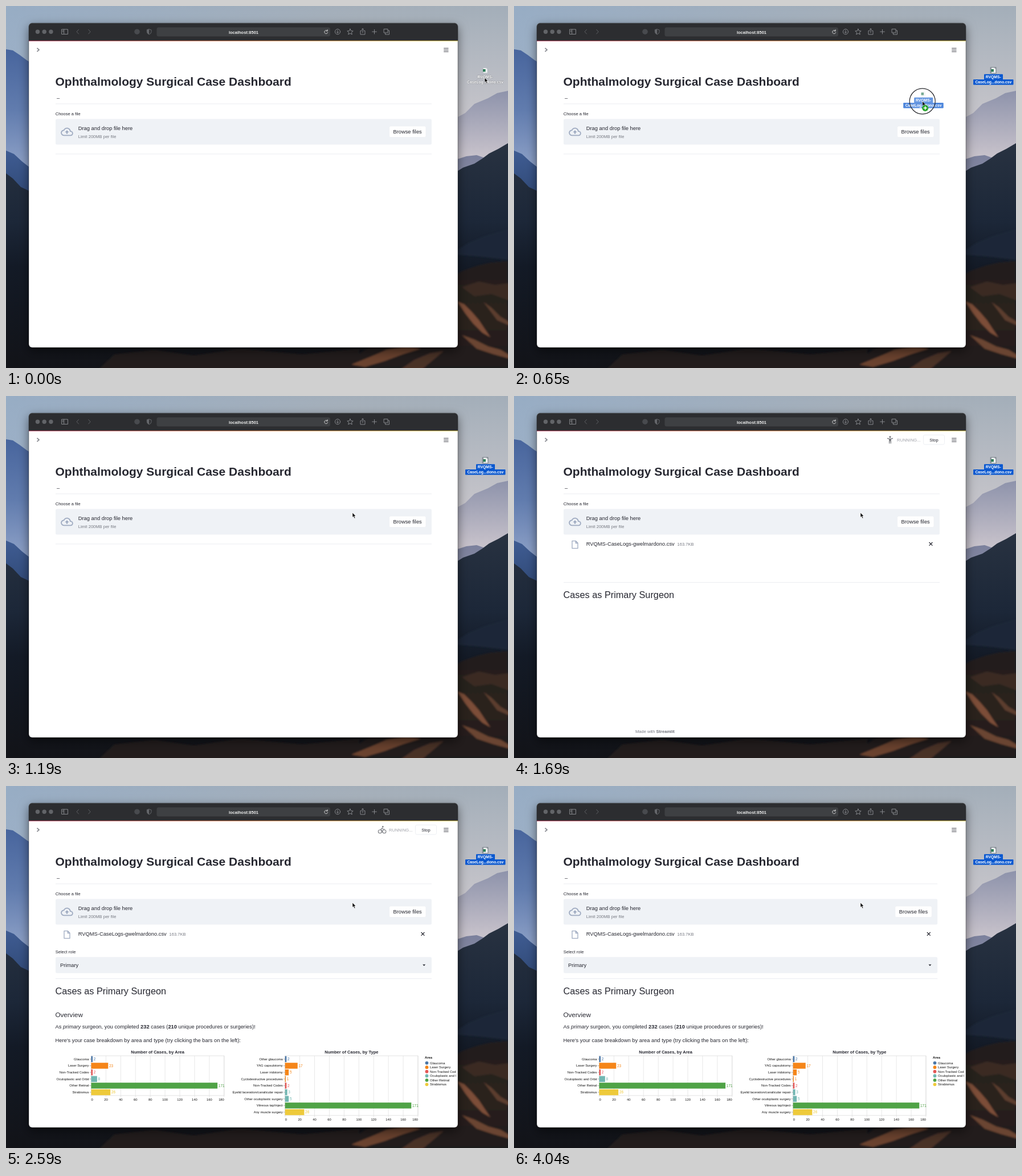
Write an HTML page that moves like this. It is 881 px wide and 636 px high and loops after 4.14 s.

```html
<!DOCTYPE html>
<html lang="en">
<head>
<meta charset="utf-8">
<title>Case dashboard upload</title>
<style>
  html, body { margin: 0; width: 100%; height: 100%; overflow: hidden; }
  svg { display: block; }
  text { font-family: "Liberation Sans", Arial, sans-serif; font-size: 9.35px; fill: #262730; }
  .title { font-size: 21px; font-weight: bold; }
  .head { font-size: 16.3px; }
  .sub { font-size: 11.6px; }
  .small { font-size: 7.55px; }
  .dim { fill: #777a83; }
  .bold { font-weight: bold; }
  .tick { font-size: 5.8px; fill: #111; }
  .value { font-size: 6.4px; }
  .end { text-anchor: end; }
  .mid { text-anchor: middle; }
  .file text { font-size: 6.75px; font-weight: bold; fill: #fff; text-anchor: middle; }
  .plain text { paint-order: stroke; stroke: #0004; stroke-width: .8px; }
  .wide { x: 87px; width: 660px; }
  .narrow .wide { width: 656.2px; }
  .narrow .edge { transform: translateX(-3.7px); }
  .rule { height: 1px; fill: #ebedf1; }
  .field { fill: #eff2f6; }
  .line { fill: none; stroke: #85878b; stroke-width: 1; stroke-linecap: round; stroke-linejoin: round; }
  .run { fill: none; stroke: #7b7d82; stroke-width: 1.1; stroke-linecap: round; stroke-linejoin: round; }
</style>
</head>
<body>
<svg id="stage" width="881" height="636" viewBox="0 0 881 636">
  <defs>
    <linearGradient id="sky" x2="0" y2=".32">
      <stop stop-color="#a3aeb9"/><stop offset="1" stop-color="#c8c6cb"/>
    </linearGradient>
    <linearGradient id="cool">
      <stop stop-color="#93acc8" stop-opacity=".75"/><stop offset=".7" stop-color="#93acc8" stop-opacity="0"/>
    </linearGradient>
    <linearGradient id="blue" x2="0" y2="1">
      <stop stop-color="#48659d"/><stop offset=".5" stop-color="#617cae"/><stop offset="1" stop-color="#91a4c9"/>
    </linearGradient>
    <linearGradient id="deep" x2="0" y2="1">
      <stop stop-color="#3f5c92"/><stop offset="1" stop-color="#2c4470"/>
    </linearGradient>
    <linearGradient id="haze" x2="0" y2="1">
      <stop stop-color="#8e93ab"/><stop offset=".8" stop-color="#c6c1ca"/>
    </linearGradient>
    <linearGradient id="far" x2="0" y2="1">
      <stop stop-color="#7b809c"/><stop offset="1" stop-color="#9295ab"/>
    </linearGradient>
    <linearGradient id="night" x2="0" y2="1">
      <stop stop-color="#283241"/><stop offset=".35" stop-color="#1c2738"/><stop offset=".55" stop-color="#131a26"/><stop offset="1" stop-color="#121318"/>
    </linearGradient>
    <linearGradient id="slope" x2="0" y2="1">
      <stop stop-color="#211e1f"/><stop offset=".5" stop-color="#2b211e"/><stop offset="1" stop-color="#1d1919"/>
    </linearGradient>
    <linearGradient id="strip">
      <stop stop-color="#a02a4a"/><stop offset=".5" stop-color="#c8713e"/><stop offset="1" stop-color="#d8c34a"/>
    </linearGradient>
    <filter id="shadow" x="-10%" y="-10%" width="120%" height="125%">
      <feDropShadow dx="0" dy="6" stdDeviation="9" flood-opacity=".5"/>
    </filter>
    <filter id="soft"><feGaussianBlur stdDeviation="1.5"/></filter>
    <clipPath id="legendClip"><rect x="730" y="465" width="60" height="70"/></clipPath>
  </defs>

  <!-- wallpaper -->
  <rect width="881" height="636" fill="url(#sky)"/>
  <rect width="881" height="636" fill="url(#cool)"/>
  <path fill="url(#blue)" d="M0 76 12 78 24 86 36 95 60 110V290H0z"/>
  <path fill="url(#deep)" d="M0 254 14 260 28 273 42 284 60 290V360H0z"/>
  <path fill="url(#haze)" d="M780 202 806 188 822 172 846 162 862 153 881 149V290H780z"/>
  <path fill="url(#far)" d="M780 273 808 264 826 262 846 269 881 266V330H780z"/>
  <path fill="url(#night)" d="M0 294 12 303 26 318 60 334 780 298 802 284 822 277 836 268 848 259 864 251 881 241V636H0z"/>
  <g filter="url(#soft)">
    <path fill="#1d2838" d="M780 436 812 416 840 404 881 392V446L830 440z"/>
    <path fill="url(#slope)" d="M780 480 800 466 828 456 850 451 881 448V650H560L640 598H780z"/>
    <path fill="#3a2a23" d="M800 494 830 484 858 490 890 486V520L852 506 822 510z"/>
    <path fill="#7c4e37" d="M792 519 804 524 818 538 830 552 842 570 850 582 836 574 820 558 806 540z"/>
    <path fill="#5c3c2d" d="M838 520 852 530 868 546 885 556V562L862 552z"/>
    <path fill="#6a4431" d="M800 578 822 586 846 598 868 604 885 614V620L856 612 826 602z"/>
    <path fill="#211b1a" d="M150 650 190 612 260 604 330 614 410 602 520 612 620 602V650z"/>
    <path fill="#6a432f" d="M606 630 640 616 668 604 704 598 728 602 696 612 664 624 630 634z"/>
    <path fill="#4a3026" d="M690 640 716 622 744 610 768 606 752 620 728 640z"/>
  </g>

  <!-- browser window -->
  <rect x="40" y="30" width="753" height="570" rx="6" fill="#fff" stroke="#0006" stroke-width=".8" filter="url(#shadow)"/>
  <path fill="#2c2d30" d="M40 61V36a6 6 0 0 1 6-6H787a6 6 0 0 1 6 6V61z"/>
  <path d="M46 30.500H787" stroke="#4a4c4f" stroke-width=".7"/>
  <rect x="40" y="60.800" width="753" height="1" fill="url(#strip)"/>
  <g fill="#626468"><circle cx="55.500" cy="45.300" r="3.700"/><circle cx="67.200" cy="45.300" r="3.700"/><circle cx="78.900" cy="45.300" r="3.700"/></g>
  <rect x="264.500" y="37.500" width="304.500" height="16" rx="3.500" fill="#3e4043"/>
  <text class="mid bold" x="417" y="48.600" style="font-size:7.5px;fill:#ececec">localhost:8501</text>
  <g class="line">
    <path d="M98 41h10.500v8.500H98zM101.700 41v8.500M99.300 43.300h1M99.300 45.200h1"/>
    <path stroke="#5d5f63" d="M127.500 41.500 124 45.200 127.500 49M144.700 41.500 148.200 45.200 144.700 49"/>
    <path d="M564 43.600A3 3 0 1 0 564.700 46.500M564.200 41.600V44H562" stroke="#d0d0d0"/>
    <circle cx="582" cy="45.200" r="4.600"/><path d="M582 42.800v4.600M580.200 45.700 582 47.500 583.800 45.700"/>
    <path d="M604 40.200 605.500 43.600 609.200 44 606.400 46.400 607.300 50 604 48.100 600.700 50 601.600 46.400 598.800 44 602.500 43.600z"/>
    <path d="M624 43.500H622V50H630V43.500H628M626 47V39.800M624.200 41.400 626 39.700 627.800 41.400"/>
    <path d="M642.700 45.200H650.300M646.500 41.400V49"/>
    <path d="M663.500 40.500h6.500v6.500h-6.500zM670.500 43h2v7h-7v-2.500"/>
    <path stroke="#65676b" d="M251.200 40.800 255 42V45.500Q254.700 48.500 251.200 50 247.700 48.500 247.400 45.500V42z"/>
  </g>
  <path fill="#65676b" d="M251.200 40.800V50Q247.700 48.500 247.400 45.500V42z"/>
  <circle cx="230" cy="45.200" r="4.800" fill="#484a4e"/>

  <!-- page -->
  <g id="page">
    <path d="M54.500 73.800 58 77 54.500 80.200" fill="none" stroke="#8b8d93" stroke-width="1.800"/>
    <path d="M768.200 74.300h8.300M768.200 77.300h8.300M768.200 80.300h8.300" stroke="#3a3b43" stroke-width="1.100"/>
    <text class="title" x="86.500" y="139.800">Ophthalmology Surgical Case Dashboard</text>
    <text x="89" y="164.500">–</text>
    <rect class="wide rule" y="171.400"/>
    <text class="small" x="86.700" y="191.600">Choose a file</text>
    <rect class="wide field" y="198.500" height="45" rx="2.500"/>
    <path transform="translate(96.200 210.200) scale(.9)" fill="#9fabc1" d="M19.350 10.040C18.670 6.590 15.640 4 12 4 9.110 4 6.600 5.640 5.350 8.040 2.340 8.360 0 10.910 0 14c0 3.310 2.690 6 6 6h13c2.760 0 5-2.240 5-5 0-2.640-2.050-4.780-4.650-4.960zM19 18H6c-2.210 0-4-1.790-4-4 0-2.050 1.530-3.760 3.560-3.970l1.070-.11.5-.95C8.080 7.140 9.940 6 12 6c2.620 0 4.880 1.860 5.390 4.430l.3 1.500 1.530.11c1.560.1 2.780 1.410 2.780 2.960 0 1.650-1.350 3-3 3zM8 13h2.550v3h2.900v-3H16l-4-4-4 4z"/>
    <text x="126.700" y="218">Drag and drop file here</text>
    <text class="small dim" x="126.700" y="232">Limit 200MB per file</text>
    <g class="edge">
      <rect x="672.500" y="211" width="64.500" height="19.700" rx="2.500" fill="#fff" stroke="#e9ebf0" stroke-width=".6"/>
      <text class="mid" x="704.600" y="223.900">Browse files</text>
    </g>

    <rect class="wide rule" y="259.500" data-on="0 1540"/>
    <g data-on="1540 4140">
      <path d="M102 254.700H108.500L112 258.300V267.700H102zM108.300 254.700V258.500H112" fill="none" stroke="#9fabc1" stroke-width="1.300" stroke-linejoin="round"/>
      <text x="126.700" y="263.200">RVQMS-CaseLogs-gwelmardono.csv</text>
      <text class="small dim" x="286.500" y="263">163.7KB</text>
      <path class="edge" d="M728.600 257 734.400 262.800M734.400 257 728.600 262.800" stroke="#262730" stroke-width="1.200"/>
    </g>
    <rect class="wide rule" y="327" data-on="1540 1740"/>
    <text class="head" x="86.500" y="355" data-on="1690 1740">Cases as Primary Surgeon</text>
    <g data-on="1740 4140">
      <text class="small" x="86.700" y="293.700">Select role</text>
      <rect class="wide field" y="300.500" height="28.300" rx="2.500"/>
      <text x="95" y="317.700">Primary</text>
      <path class="edge" d="M731.200 313.500H736.200L733.700 316.200z" fill="#262730"/>
      <rect class="wide rule" y="337.900"/>
      <text class="head" x="86.500" y="366">Cases as Primary Surgeon</text>
    </g>
    <g data-on="1790 4140">
      <text class="sub" x="86.500" y="406">Overview</text>
      <text x="86.500" y="425.800">As <tspan font-style="italic">primary</tspan> surgeon, you completed <tspan class="bold">232</tspan> cases (<tspan class="bold">210</tspan> unique procedures or surgeries)!</text>
      <text x="86.500" y="449.800">Here's your case breakdown by area and type (try clicking the bars on the left):</text>
    </g>
    <text class="small dim" x="213" y="591.800" data-on="1640 2590">Made with <tspan class="bold" style="fill:#70737b">Streamlit</tspan></text>
    <g id="charts" data-on="2590 4140"></g>

    <g id="status" data-on="1640 3540">
      <g class="run">
        <g data-on="1640 1790">
          <circle cx="660" cy="72" r="1.100" fill="#7b7d82"/>
          <path d="M655.500 74.500 658.600 75.300H661.400L664.500 74.500M658.700 75.500V83M661.300 75.500V83M660 75.500V79" stroke-width="1.300"/>
        </g>
        <g data-on="1790 2590">
          <circle cx="662.500" cy="71.800" r="1" fill="#7b7d82"/>
          <path d="M656.800 74.600 659 73.500 662 75 660.300 78.200H664L664.800 82M657.300 77.800A3.100 3.100 0 1 0 661.700 81.500"/>
        </g>
        <g data-on="2590 4140">
          <circle cx="656.300" cy="80" r="3"/><circle cx="663.900" cy="80" r="3"/><circle cx="661.300" cy="71.600" r=".9" fill="#7b7d82"/>
          <path d="M660 81.200V78.500L657.600 76.400 660 74 662 76H664.500"/>
        </g>
      </g>
      <text class="small" x="672" y="80" style="fill:#a0a2a9">RUNNING...</text>
      <rect x="718.500" y="68.500" width="37" height="16.700" rx="2.500" fill="#fff" stroke="#e9ebf0" stroke-width=".8"/>
      <text class="small mid" x="737" y="79.500">Stop</text>
    </g>
  </g>

  <!-- desktop file, drag copy and pointer -->
  <g class="file plain" data-on="0 50">
    <path d="M837.700 109H842.700L844.700 111V117.500H837.700z" fill="#eef1f1"/>
    <rect x="837" y="111" width="4.500" height="4.500" fill="#2b7b57"/>
    <text x="841" y="127.200">RVQMS-</text>
    <text x="841" y="136.200">CaseLog...dono.csv</text>
  </g>
  <g class="file" data-on="50 4140">
    <rect x="835.500" y="107" width="11.300" height="12" rx="1.500" fill="#8c929b"/>
    <g id="label">
      <path d="M838 108.500H843L845.300 110.800V117.500H838z" fill="#f2f5f3"/>
      <rect x="837.300" y="111" width="4.600" height="4.600" fill="#2b7b57"/>
      <path d="M826 119.800H857a1 1 0 0 1 1 1V129H875.500a1 1 0 0 1 1 1V137.500a1 1 0 0 1-1 1H807a1 1 0 0 1-1-1V130a1 1 0 0 1 1-1H825V120.800a1 1 0 0 1 1-1z" fill="#0b59d0"/>
      <text x="841.300" y="127.200">RVQMS-</text>
      <text x="841.300" y="136.200">CaseLog...dono.csv</text>
    </g>
  </g>
  <g id="ghost" class="file" data-on="600 1190"><use href="#label" opacity=".72"/></g>
  <g id="pointer">
    <circle id="ring" data-on="550 1190" fill="#fff" fill-opacity=".12" stroke="#26272c" stroke-width="1.200"/>
    <path d="M0 0V8.200L1.900 6.500 3.400 9.900 4.900 9.200 3.400 6H6z" fill="#0a0a0a" stroke="#fff" stroke-width=".6"/>
    <g id="badge">
      <circle cx="5" cy="12" r="5.600" fill="#2ba52f"/>
      <path d="M2 12H8M5 9V15" stroke="#fff" stroke-width="1.500"/>
    </g>
  </g>
</svg>
<script>
const LOOP = 4140;
const $ = id => document.getElementById(id);
const clamp = v => Math.min(1, Math.max(0, v));

const areas = ['Glaucoma', 'Laser Surgery', 'Non-Tracked Codes', 'Oculoplastic and Orbit', 'Other Retinal', 'Strabismus'];
const colors = ['#4c78a8', '#f58518', '#e45756', '#72b7b2', '#4fa346', '#eeca3b'];
const byArea = [2, 23, 2, 8, 171, 26].map((n, i) => [areas[i], n, i]);
const byType = [
  ['Other glaucoma', 2, 0], ['YAG capsulotomy', 17, 1], ['Laser iridotomy', 5, 1],
  ['Cyclodestructive procedures', 1, 1], ['Non-Tracked Codes', 2, 2],
  ['Eyelid laceration/canalicular repair', 3, 3], ['Other oculoplastic surgery', 5, 3],
  ['Vitreous tap/inject', 171, 4], ['Any muscle surgery', 26, 5]
];

const text = (x, y, cls, str, fill = '') =>
  `<text x="${x}" y="${y}" class="${cls}"${fill && ` style="fill:${fill}"`}>${str}</text>`;

function chart(x, title, rows) {
  const top = 474, step = 11.65, width = 233.3, bottom = top + step * rows.length;
  const scale = n => x + n * width / 180;
  let out = text(x + width / 2, 469.7, 'small bold mid', title);
  for (let n = 0; n <= 180; n += 20) {
    const cls = n === 0 ? '' : n === 180 ? 'end' : 'mid';
    out += `<path d="M${scale(n)} ${top}V${bottom + 2.5}" stroke="#dfdfdf" stroke-width=".7"/>`;
    out += text(scale(n), bottom + 9.2, 'tick ' + cls, n);
  }
  out += `<rect x="${x}" y="${top}" width="${width}" height="${bottom - top}" fill="none" stroke="#d8d8d8" stroke-width=".7"/>`;
  rows.forEach(([label, n, c], i) => {
    const y = top + step * (i + .5);
    out += `<path d="M${x - 3} ${y}H${x}" stroke="#888" stroke-width=".6"/>`;
    out += `<rect x="${x}" y="${y - 5.2}" width="${scale(n) - x}" height="10.4" fill="${colors[c]}"/>`;
    out += text(x - 4, y + 1.9, 'tick end', label) + text(scale(n) + 1.7, y + 2.2, 'value', n, colors[c]);
  });
  return out;
}

function legend() {
  const items = areas.map((name, i) => {
    const y = 486.6 + 7.55 * i;
    return `<circle cx="738.5" cy="${y}" r="2.9" fill="${colors[i]}"/>` + text(744, y + 2, 'tick', name);
  });
  return `<g clip-path="url(#legendClip)">${text(735, 479, 'tick bold', 'Area')}${items.join('')}</g>`;
}

$('charts').innerHTML = chart(149.5, 'Number of Cases, by Area', byArea) +
  chart(489.7, 'Number of Cases, by Type', byType) + legend();

const timed = [...document.querySelectorAll('[data-on]')].map(el => {
  const [from, to] = el.dataset.on.split(' ').map(Number);
  return { el, from, to };
});

const hold = t => t < 850 ? Math.floor(t / 50) * 50 : t < 940 ? 850 : Math.floor((t - 40) / 50) * 50 + 40;

function render(now) {
  const t = hold(now % LOOP);
  for (const { el, from, to } of timed) el.style.display = t >= from && t < to ? '' : 'none';

  const drag = 1 - (1 - clamp((t - 550) / 300)) ** 1.6;
  const x = t < 550 ? 840 : 816 - 208 * drag;
  const y = t < 550 ? 126 : 133 + 72 * drag;
  const fade = t < 1140 ? 1 : .5;
  $('pointer').setAttribute('transform', `translate(${x} ${y})`);
  $('ghost').setAttribute('transform', `translate(${x - 839.5} ${y - 126.3})`);
  $('ghost').style.opacity = fade;
  $('ring').setAttribute('r', 13 + 9.5 * clamp((t - 550) / 100));
  $('ring').style.opacity = fade;
  $('badge').style.display = x < 770 && t < 1140 ? '' : 'none';
  $('status').style.opacity = 1 - clamp((t - 3390) / 150);
  $('page').classList.toggle('narrow', t >= 2640);
  requestAnimationFrame(render);
}
render(performance.now());
</script>
</body>
</html>
```
